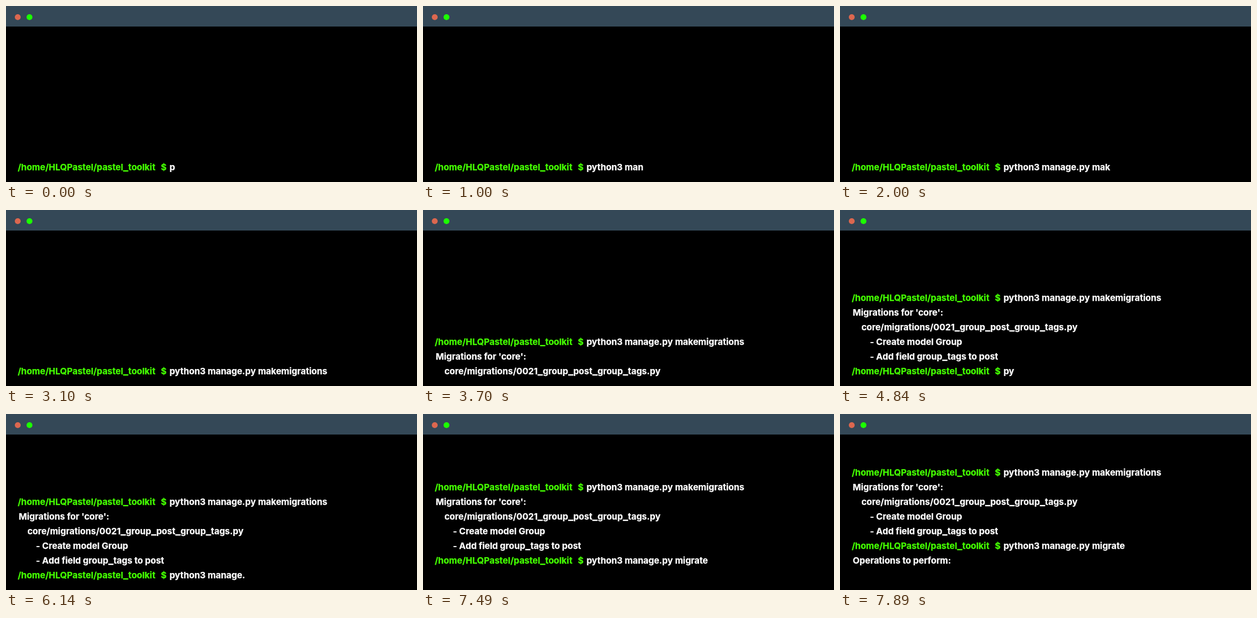
An HTML page that plays this animation: 700x300 px, repeating every 8000 ms.

```html
<!DOCTYPE html>
<html lang="en">
<head>
<meta charset="utf-8">
<title>Terminal</title>
<style>
  html, body { margin: 0; width: 100%; height: 100%; overflow: hidden; background: #000; }
  svg { display: block; }
  text { font: 700 15px Inter, "Open Sans", sans-serif; fill: #fff; stroke: #fff; stroke-width: .25px; }
  .path { fill: #4f0; stroke: #4f0; }
  .wide { font-size: 18.3px; }
</style>
</head>
<body>
<svg width="700" height="300" viewBox="0 0 700 300">
  <rect width="700" height="300"/>
  <rect width="700" height="35" fill="#344857"/>
  <circle cx="20" cy="19" r="5" fill="#dc674f"/>
  <circle cx="40" cy="19" r="5" fill="#1cff00"/>
  <g id="screen"></g>
</svg>
<script>
const LOOP = 8000, KEY = 100, LINE = 25, BASE = 280, INDENT = 14.6;
const PATH = "/home/HLQPastel/pastel_toolkit";

// at: the line scrolls in; show: its text appears, or typing starts for cmd
const lines = [
  { at: 0, show: 0, cmd: "python3 manage.py makemigrations" },
  { at: 3400, show: 3600, level: 0, out: "Migrations for 'core':" },
  { at: 3700, show: 3700, level: 1, out: "core/migrations/0021_group_post_group_tags.py" },
  { at: 3900, show: 4100, level: 2, out: "- Create model Group" },
  { at: 4220, show: 4420, level: 2, out: "- Add field group_tags to post" },
  { at: 4540, show: 4740, cmd: "python3 manage.py migrate" },
  { at: 7490, show: 7690, level: 0, out: "Operations to perform:" },
  { at: 7890, show: LOOP, level: 0, out: "" }
];

const screen = document.getElementById("screen");

// Underscores are set a little wider than the font's own
function text(x, y, s, cls = "") {
  const body = s.replaceAll("_", '<tspan class="wide">_</tspan>');
  return `<text class="${cls}" x="${x}" y="${y}">${body}</text>`;
}

function drawLine(line, y, t) {
  if (t < line.show) return "";
  if (!line.cmd) return text(21.8 + line.level * INDENT, y, line.out);
  const typed = line.cmd.slice(0, Math.floor((t - line.show) / KEY) + 1);
  return text(20, y, PATH, "path") + text(263.8, y, "$", "path") + text(278.4, y, typed);
}

function render(t) {
  const seen = lines.filter(line => line.at <= t);
  return seen.map((line, i) => drawLine(line, BASE - LINE * (seen.length - 1 - i), t)).join("");
}

let start, last;
function frame(now) {
  start ??= now;
  const markup = render((now - start) % LOOP);
  if (markup !== last) screen.innerHTML = last = markup;
  requestAnimationFrame(frame);
}
screen.innerHTML = last = render(0);
requestAnimationFrame(frame);
</script>
</body>
</html>
```
